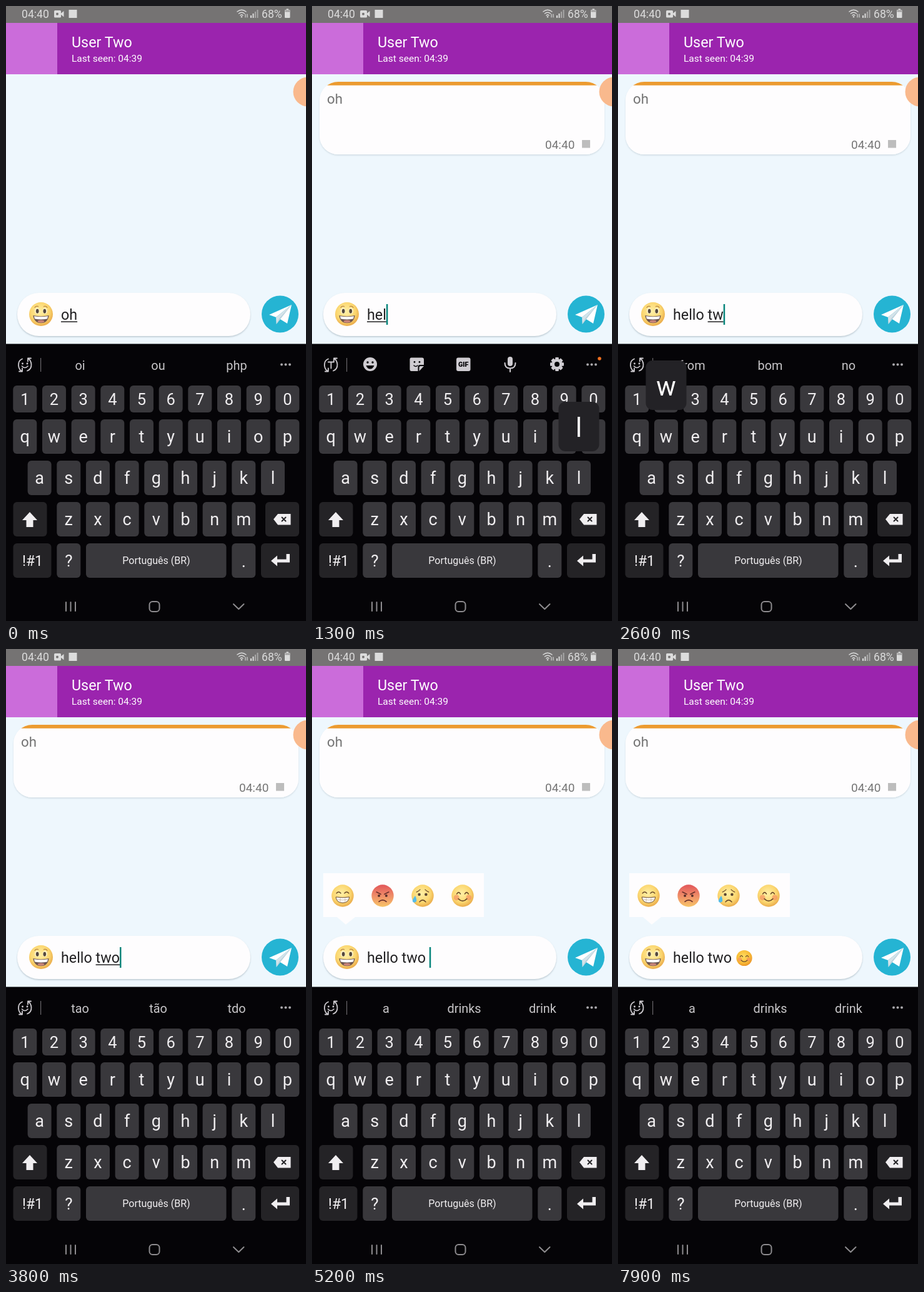
An HTML page that plays this animation: 480 by 982 pixels, repeating every 8 s.

```html
<!DOCTYPE html>
<html lang="en">
<head>
<meta charset="utf-8">
<title>Chat</title>
<style>
html, body { margin: 0; width: 100%; height: 100%; overflow: hidden; background: #050407; }
svg { display: block; width: 100%; height: 100%; }
text { font-family: Roboto, "Liberation Sans", sans-serif; white-space: pre; }
</style>
</head>
<body>
<svg id="stage" viewBox="0 0 480 982" xmlns="http://www.w3.org/2000/svg"></svg>
<script>
const LOOP = 8000, STEP = 100, BLINK = 500;
const TEXT_X = 88, TEXT_SIZE = 23.3, PITCH = 46.67;
const KEY = '#39383c', DARK_KEY = '#242326', PRESSED = '#5d5c60', ICON = '#cfccd1';

const rect = (x, y, w, h, fill, r = 0, extra = '') =>
  `<rect x="${x}" y="${y}" width="${w}" height="${h}" rx="${r}" fill="${fill}" ${extra}/>`;
const circle = (x, y, r, fill, extra = '') => `<circle cx="${x}" cy="${y}" r="${r}" fill="${fill}" ${extra}/>`;
const shape = (d, fill, extra = '') => `<path d="${d}" fill="${fill}" ${extra}/>`;
const line = (d, color, width, extra = '') =>
  `<path d="${d}" fill="none" stroke="${color}" stroke-width="${width}" stroke-linecap="round" stroke-linejoin="round" ${extra}/>`;
const label = (x, y, size, fill, str, anchor = 'start', extra = '') =>
  `<text x="${x}" y="${y}" font-size="${size}" fill="${fill}" text-anchor="${anchor}" ${extra}>${str}</text>`;
const at = (x, y, body, scale = 1) => `<g transform="translate(${x} ${y}) scale(${scale})">${body}</g>`;

// Faces are drawn around the origin with radius 18.
const INK = '#6b4a2b';
const features = {
  open: () => [-1, 1].map(s =>
      `<ellipse cx="${s * 6}" cy="-5" rx="3.6" ry="4.6" fill="#fff3c4"/>` +
      `<ellipse cx="${s * 5.5}" cy="-4.5" rx="2.2" ry="3.2" fill="#54483f"/>` +
      line(`M${s * 4} -11.5Q${s * 7} -13 ${s * 9.5} -10`, '#b07a3a', 1)).join('') +
    shape('M-12 2Q0 4.5 12 2Q10.5 13.5 0 13.5T-12 2Z', '#6e5650') +
    shape('M-10.5 3Q0 5.2 10.5 3L9.5 7Q0 9 -9.5 7Z', '#fff') +
    '<ellipse cy="11" rx="5" ry="2" fill="#c98479"/>',
  grin: () => line('M-10 -4Q-6.500 -8 -3 -4M3 -4Q6.500 -8 10 -4', INK, 1.5) +
    shape('M-11 2Q0 4 11 2Q10 11.500 0 11.500T-11 2Z', '#fff', `stroke="${INK}" stroke-width="1"`) +
    line('M-10 6Q0 8 10 6M-4 3V10.500M4 3V10.500', '#b9a48c', .7),
  angry: () => line('M-10 -6L-3 -2.500M10 -6L3 -2.500', '#69302c', 1.7) +
    circle(-6, 0, 2, '#55302b') + circle(6, 0, 2, '#55302b') + line('M-6 9.500Q0 4.500 6 9.500', '#69302c', 1.7),
  sad: () => line('M-10 -6Q-7 -7 -4 -10M10 -6Q7 -7 4 -10', INK, 1.2) +
    circle(-5.5, -2, 2.3, '#5b4632') + circle(5.5, -2, 2.3, '#5b4632') +
    line('M-5 10Q0 4 5 10', INK, 1.6) + shape('M-12 0Q-20 10 -13.500 11Q-7 10 -12 0Z', '#54bce8'),
  blush: () => circle(-10, 3, 4.5, '#f58e62', 'opacity=".65"') + circle(10, 3, 4.5, '#f58e62', 'opacity=".65"') +
    line('M-9.500 -3Q-6.500 -8 -3.500 -3M3.500 -3Q6.500 -8 9.500 -3M-7 5Q0 12 7 5', INK, 1.6)
};
const face = (kind, x, y, r, fill = 'url(#yellow)') => at(x, y, circle(0, 0, 18, fill) + features[kind](), r / 18);

function defs() {
  const radial = (id, a, b, c) => `<radialGradient id="${id}" cx=".45" cy=".4" r=".62">
    <stop stop-color="${a}"/><stop offset=".65" stop-color="${b}"/><stop offset="1" stop-color="${c}"/></radialGradient>`;
  return `<defs>${radial('yellow', '#fff0a6', '#fbd66f', '#e9a848')}${radial('gold', '#ffdc62', '#f9bd37', '#ea9126')}
    <linearGradient id="red" x2="0" y2="1"><stop stop-color="#e2565a"/><stop offset=".5" stop-color="#ef8d68"/><stop offset="1" stop-color="#f7c467"/></linearGradient>
    <filter id="soft" x="-10%" y="-20%" width="120%" height="150%"><feDropShadow dx="0" dy="1.5" stdDeviation="1.3" flood-color="#6b7f8c" flood-opacity=".4"/></filter>
    <clipPath id="cardClip">${rect(12, 121, 456, 116, '#fff', 30)}</clipPath></defs>`;
}

function statusBar() {
  const ink = '#dcdcdc';
  let s = rect(0, 0, 480, 27, '#757373') + label(25, 19, 17.6, ink, '04:40') + label(409, 19, 17.6, ink, '68%');
  s += rect(77, 7, 11, 11.5, ink, 1.5) + shape('M87 12.500L92.500 8V17.500L87 13Z', ink) + circle(82, 12.7, 2, '#757373');
  s += rect(100.5, 6, 13, 13, ink);
  s += line('M370 9Q377 3.500 384 9M372.500 12Q377 8.500 381.500 12M375 15Q377 13 379 15', ink, 1.5) + circle(377, 17.3, 1.2, ink);
  s += line('M383 13V18M386 13V18', ink, 1.1);
  for (let i = 0; i < 4; i++) s += rect(391 + i * 3.5, 15 - i * 3, 2, 4 + i * 3, ink, 0, `opacity="${i < 2 ? 1 : .5}"`);
  return s + rect(448.5, 4.5, 3.5, 2, ink) + rect(446, 6, 8.5, 13, ink, 1) + rect(446.5, 6.5, 7.5, 3, '#a3a2a2');
}

function chat() {
  const top = rect(0, 27, 480, 82, '#9b24ae') + rect(0, 27, 82, 82, '#cb6cda') +
    label(105, 66, 23.3, '#fff', 'User Two') + label(105, 89, 15.5, '#fff', 'Last seen: 04:39');
  const card = `<g id="card">${rect(12, 121, 456, 116, '#fff', 30, 'filter="url(#soft)" opacity=".6"')}
    <g clip-path="url(#cardClip)">${rect(12, 121, 456, 116, '#fefdfe')}${rect(12, 121, 456, 5.7, '#ec9b30')}</g>
    ${label(24, 156, 22.2, '#727272', 'oh')}${label(373, 228, 19, '#757575', '04:40')}${rect(432, 214, 13, 12.5, '#bdbdbd')}</g>`;
  const picker = `<g id="picker">${shape('M18 358H275V428H69L54 440L40 428H18Z', '#fefdfe')}
    ${face('grin', 49, 394, 17.7)}${face('angry', 113, 394, 17.7, 'url(#red)')}${face('sad', 177, 394, 17.7)}${face('blush', 241, 394, 17.7)}</g>`;
  const input = rect(18, 458, 373, 69, '#fefdfe', 34.5, 'filter="url(#soft)"') + face('open', 56, 492, 19) +
    label(TEXT_X, 501, TEXT_SIZE, '#9c9b9d', 'Type something..', 'start', 'id="hint"') +
    label(TEXT_X, 501, TEXT_SIZE, '#212022', '', 'start', 'id="typed"') +
    rect(TEXT_X, 503.5, 0, 1.5, '#212022', 0, 'id="underline"') +
    `<g id="emoji">${face('blush', 202, 493.5, 12.6, 'url(#gold)')}</g>` + rect(0, 476, 2.5, 33, '#07857b', 0, 'id="cursor"');
  const send = circle(438.5, 492, 29.5, '#25b4d3') + shape('M457 477L421 493L432 497Z', '#fff') +
    shape('M457 477L437 499L450 507Z', '#fff') + shape('M457 477L432 497L432.500 508Z', '#d5e3e9') + shape('M457 477L437 499L432.500 508Z', '#b9d3dd');
  return rect(0, 108, 480, 432, '#eef7fd') + top + card + circle(483, 137, 23.5, '#f9b98d') + picker + input + send;
}

function strip() {
  const cycle = line('M26 563.500Q19.500 566 20 574Q20.500 580 25 583M21 583.500H26V578.500M34 582.500Q41 580 40.500 572Q40 566 35.500 563M40 562.500H35V567.500', ICON, 1.8);
  const smile = circle(26.5, 571, 1.4, ICON) + circle(34, 571, 1.4, ICON) + line('M25.500 575Q30.200 580 35 575', ICON, 1.7);
  const bigT = line('M26 568.500H35M30.500 568.500V578.500', ICON, 1.8);
  const bg = '#050407';
  let gear = circle(392, 572, 8.5, ICON);
  for (let a = 0; a < 360; a += 45) gear += rect(389.2, 561, 5.6, 6, ICON, 1, `transform="rotate(${a} 392 572)"`);
  const tools = circle(93, 572, 11, ICON) + circle(89, 569, 1.7, bg) + circle(97, 569, 1.7, bg) + shape('M86.500 574H99.500Q97.500 579.500 93 579.500T86.500 574Z', bg) +
    shape('M159 561.500H176Q179 561.500 179 564.500V573H173Q169.500 573 169.500 577V583H159Q156.500 583 156.500 580V564.500Q156.500 561.500 159 561.500Z', ICON) +
    shape('M179 575L171.500 583V577Q171.500 575 174 575Z', ICON) + circle(164, 568.5, 1.4, bg) + circle(172, 568.5, 1.4, bg) + line('M163 574Q166 577 169 574', bg, 1.5) +
    rect(231, 561.5, 22.5, 21.5, ICON, 3) + label(242.2, 576.3, 10.8, bg, 'GIF', 'middle', 'font-weight="900"') +
    rect(313, 560, 8, 15, ICON, 4) + line('M308.500 570Q308.500 578.500 317 578.500T325.500 570M317 579V584', ICON, 2) +
    gear + circle(392, 572, 4, bg) + circle(460, 563, 2.8, '#f0701f');
  return cycle + `<g id="tools">${bigT}${tools}</g><g id="smileIcon">${smile}</g>` + rect(55, 562, 1.2, 22, '#69676b') +
    [118.5, 243.5, 369].map((x, i) => label(x, 581, 19.9, '#c8c6c9', '', 'middle', `id="word${i}"`)).join('') +
    [441, 447.5, 454].map(x => circle(x, 572.5, 2, '#a9a7ab')).join('');
}

const keyPlace = {};
function keyboard() {
  const ink = '#f0eef0';
  const keyRow = (chars, cx, y, h, size, base) => [...chars].map((c, i) => {
    const x = cx + i * PITCH;
    keyPlace[c] = { x, y };
    return rect(x - 19, y, 38, h, KEY, 6, `data-key="${c}"`) + label(x, base, size, ink, c, 'middle');
  }).join('');
  let s = rect(0, 539.5, 480, 443, '#050407') + strip();
  s += keyRow('1234567890', 30.3, 606, 43, 25.5, 637) + keyRow('qwertyuiop', 30.3, 660, 55, 27, 697) +
    keyRow('asdfghjkl', 53.6, 726, 55, 27, 763) + keyRow('zxcvbnm', 100.3, 792, 55, 27, 829) +
    keyRow('?', 100.3, 858, 55, 26, 895) + keyRow('.', 380.3, 858, 55, 27, 896);
  s += rect(11.5, 792, 54, 55, DARK_KEY, 6) + rect(415, 792, 54, 55, DARK_KEY, 6) + rect(11.5, 858, 61, 55, DARK_KEY, 6) +
    rect(408, 858, 61, 55, DARK_KEY, 6) + rect(128, 858, 224.500, 55, KEY, 6, 'data-key=" "');
  s += shape('M38 808L50 821H43.500V832H32.500V821H26Z', ink) +
    shape('M428 819.500L435 811H455.500V828.500H435Z', ink) + line('M441.500 816.500L447.500 822.500M447.500 816.500L441.500 822.500', DARK_KEY, 2) +
    shape('M424 886L434 877.500V883.500H448.500V875H454V888.500H434V894.500Z', ink) +
    label(42.5, 894, 23, ink, '!#1', 'middle') + label(240.5, 891, 16, ink, 'Português (BR)', 'middle');
  const nav = '#8e8c8f';
  s += line('M96 952V966M103.500 952V966M111 952V966', nav, 2) +
    rect(229.5, 951, 16, 16, 'none', 5, `stroke="${nav}" stroke-width="2"`) + line('M364 955L372.300 963L380.500 955', nav, 2);
  return s + `<g id="balloon">${rect(-32.5, 0, 65, 79, '#232226', 11)}${label(0, 55.5, 42, '#fff', '', 'middle', 'id="balloonText"')}</g>`;
}

const svg = document.getElementById('stage');
svg.innerHTML = defs() + chat() + statusBar() + keyboard();
const el = {};
svg.querySelectorAll('[id]').forEach(n => el[n.id] = n);
const keyRects = [...svg.querySelectorAll('[data-key]')];
const pen = document.createElement('canvas').getContext('2d');

// Each entry changes part of the state from its time on; null words show the toolbar.
const start = { text: 'oh', words: ['oi', 'ou', 'php'], card: 0, picker: 0, balloon: '', down: '', emoji: false, edit: -BLINK };
const script = [
  [100, { text: '', words: null }],
  [200, { card: .5 }],
  [300, { card: 1 }],
  [1000, { balloon: 'h', down: 'h' }],
  [1100, { text: 'h', down: '' }],
  [1200, { text: 'he', balloon: 'e' }],
  [1300, { text: 'hel', balloon: 'l' }],
  [1400, { balloon: '' }],
  [1500, { text: 'hell', balloon: 'l' }],
  [1600, { text: 'hello', balloon: 'o' }],
  [1700, { balloon: '' }],
  [1900, { down: ' ' }],
  [2000, { text: 'hello ', down: '', words: ['', '', ''] }],
  [2200, { words: ['from', 'bom', 'no'] }],
  [2400, { text: 'hello t', balloon: 't' }],
  [2500, { balloon: '' }],
  [2600, { text: 'hello tw', balloon: 'w' }],
  [2700, { balloon: '' }],
  [2800, { text: 'hello two', balloon: 'o' }],
  [2900, { balloon: '', words: ['tao', 'tão', 'tdo'] }],
  [4000, { down: ' ' }],
  [4200, { text: 'hello two ', down: '' }],
  [4300, { words: ['', '', ''] }],
  [4500, { words: ['a', 'drinks', 'drink'] }],
  [5000, { picker: .3 }],
  [5100, { picker: .7 }],
  [5200, { picker: 1 }],
  [6200, { picker: .5 }],
  [6300, { picker: 0, emoji: true, edit: 6300 }],
  [7700, { picker: .3 }],
  [7800, { picker: .7 }],
  [7900, { picker: 1 }]
];

function stateAt(t) {
  const state = { ...start };
  for (const [time, change] of script) {
    if (time > t) break;
    Object.assign(state, change);
    if ('text' in change) state.edit = time;
  }
  return state;
}

const show = (node, visible) => node.setAttribute('visibility', visible ? 'visible' : 'hidden');
const widthOf = str => {
  pen.font = `${TEXT_SIZE}px Roboto, "Liberation Sans", sans-serif`;
  return pen.measureText(str).width;
};

function render(time) {
  const t = Math.floor((time % LOOP) / STEP) * STEP;
  const s = stateAt(t);
  el.card.setAttribute('opacity', s.card);
  el.picker.setAttribute('opacity', s.picker);
  show(el.hint, !s.text);
  show(el.emoji, s.emoji);
  el.typed.textContent = s.text;

  const wordStart = s.text.lastIndexOf(' ') + 1;
  const lead = widthOf(s.text.slice(0, wordStart)), full = widthOf(s.text);
  el.underline.setAttribute('x', TEXT_X + lead);
  el.underline.setAttribute('width', Math.max(0, full - lead));
  el.cursor.setAttribute('x', TEXT_X + full + (s.emoji ? 28.5 : 0));
  show(el.cursor, Math.floor((t - s.edit) / BLINK) % 2 === 0);

  show(el.tools, !s.words);
  show(el.smileIcon, s.words);
  for (let i = 0; i < 3; i++) el['word' + i].textContent = s.words ? s.words[i] : '';

  show(el.balloon, s.balloon);
  el.balloonText.textContent = s.balloon;
  if (s.balloon) {
    const { x, y } = keyPlace[s.balloon];
    el.balloon.setAttribute('transform', `translate(${x} ${y - 94})`);
  }
  for (const key of keyRects) key.setAttribute('fill', key.dataset.key === s.down ? PRESSED : KEY);
}

let origin;
function tick(now) {
  origin ??= now;
  render(now - origin);
  requestAnimationFrame(tick);
}
render(0);
requestAnimationFrame(tick);
</script>
</body>
</html>
```
